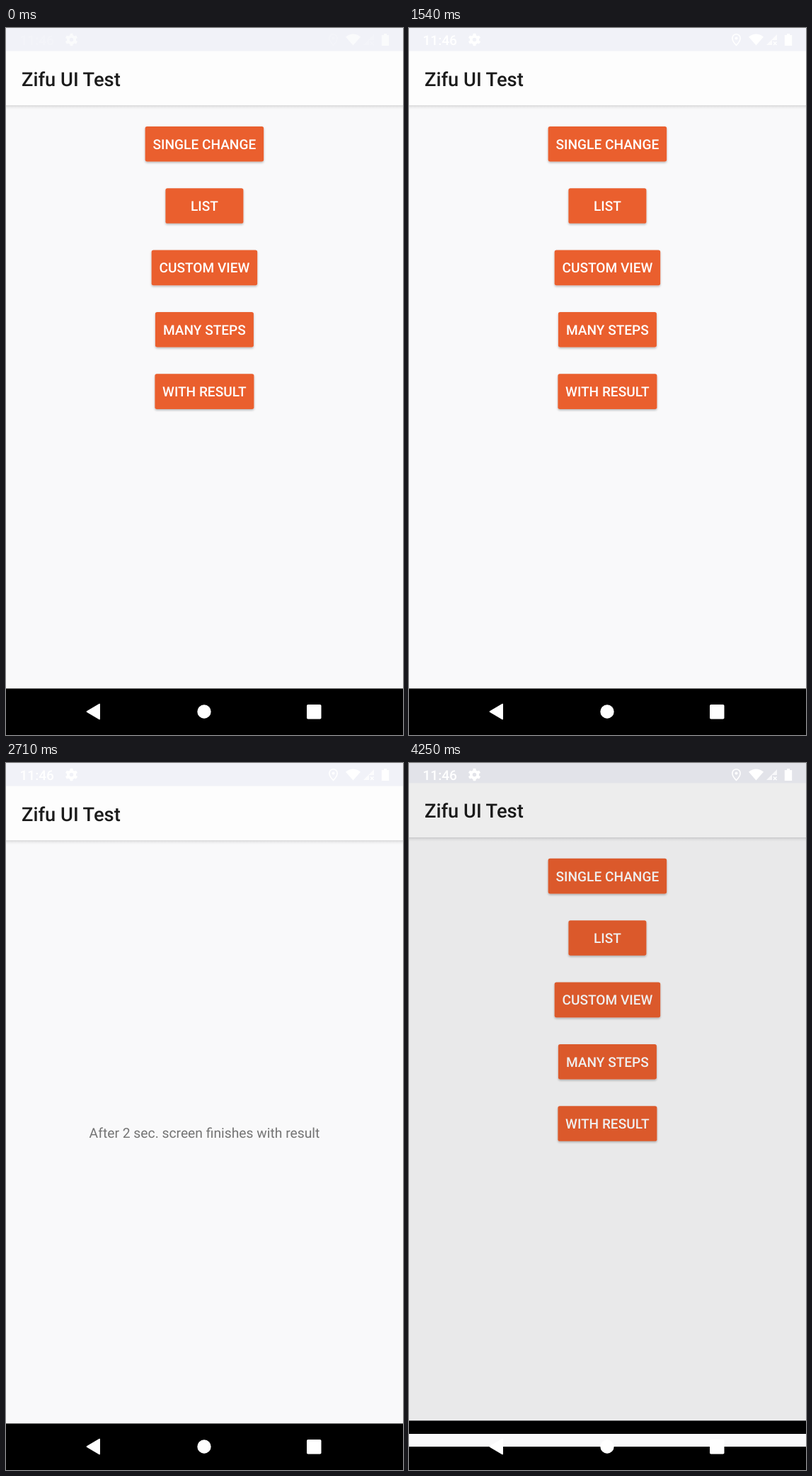
Recreate the animation shown at these times as an HTML page. Size 561 by 998 pixels, loop 4.34 s.

```html
<!DOCTYPE html>
<html lang="en">
<head>
<meta charset="utf-8">
<title>UI test</title>
<style>
  html, body { margin: 0; width: 100%; height: 100%; overflow: hidden; background: #000; }
  svg { display: block; width: 561px; height: 998px; }
  text { font-family: Roboto, "Noto Sans", sans-serif; text-rendering: geometricPrecision; }
  .title { font-size: 27.3px; font-weight: 500; fill: #1b1b1b; }
  .label { font-size: 19.1px; font-weight: 500; fill: #fff; text-anchor: middle; }
  .note { font-size: 19.3px; fill: #747474; text-anchor: middle; }
  .clock { font-size: 19.1px; font-weight: 500; }
</style>
</head>
<body>
<svg viewBox="0 0 561 998">
  <defs>
    <linearGradient id="shade" x2="0" y2="1">
      <stop offset="0" stop-color="#000" stop-opacity=".16"/>
      <stop offset=".4" stop-color="#000" stop-opacity=".06"/>
      <stop offset="1" stop-color="#000" stop-opacity="0"/>
    </linearGradient>
    <filter id="lift" x="-10%" y="-20%" width="120%" height="150%">
      <feDropShadow dx="0" dy="1.6" stdDeviation="1.4" flood-color="#000" flood-opacity=".28"/>
    </filter>
    <clipPath id="reveal"><rect id="revealBox" width="561" height="998"/></clipPath>
    <g id="frame">
      <rect width="561" height="998"/>
      <rect width="561" height="932.4" fill="#f9f9fa"/>
      <rect width="561" height="33" fill="#f1f2f8"/>
      <rect y="109" width="561" height="6" fill="url(#shade)"/>
      <rect y="32.5" width="561" height="76.7" fill="#fdfdfd"/>
      <text class="title" x="22" y="81.5">Zifu UI Test</text>
    </g>
  </defs>

  <g id="home"><use href="#frame"/></g>
  <rect id="dim" width="561" height="998" opacity="0"/>
  <g id="detail" clip-path="url(#reveal)">
    <use href="#frame"/>
    <text class="note" x="280.5" y="528.7">After 2 sec. screen finishes with result</text>
  </g>

  <g id="status" fill="#fff">
    <g class="thin">
      <text class="clock" x="19.5" y="23.8">11:46</text>
      <path d="M462.5 8.8a5.6 5.6 0 0 1 5.6 5.6c0 4.2-5.6 10-5.6 10s-5.6-5.8-5.6-10a5.6 5.6 0 0 1 5.6-5.6z" fill="none" stroke="#fff" stroke-width="1.6"/>
      <circle cx="462.5" cy="14.4" r="2"/>
      <path d="M520 9V17H513V24H505Z" opacity=".75"/>
      <path d="M515 19.5l4.5 4.5m0-4.5l-4.5 4.5" stroke="#fff" stroke-width="1.5"/>
    </g>
    <g id="gear" transform="translate(92.5 16.5)">
      <circle r="4.7" fill="none" stroke="#fff" stroke-width="3.8"/>
    </g>
    <path d="M480 12.5Q490.5 4.5 501 12.5L490.5 24.5Z"/>
    <path d="M534 8h4v2h3.2v15h-10.4V10h3.2z"/>
  </g>
  <g fill="#fff" stroke="#fff" stroke-linejoin="round">
    <path d="M114.4 965L132.2 954.5V975.5Z" stroke-width="1.5"/>
    <circle cx="280" cy="965" r="9.7" stroke="none"/>
    <rect x="425" y="955" width="20.5" height="20.5" rx="1.8" stroke="none"/>
  </g>
</svg>
<script>
const LOOP = 4340, RISE = 41, SINK = 20, HEIGHT = 998, DIM = .13;
const OPEN_STEPS = [1960, 2000, 2080, 2160, 2250, 2330, 2370, 2460];
const CLOSE_STEPS = [4000, 4080, 4160, 4250];
const $ = id => document.getElementById(id);

function add(parent, tag, attrs, text = '') {
  const el = document.createElementNS('http://www.w3.org/2000/svg', tag);
  for (const key in attrs) el.setAttribute(key, attrs[key]);
  el.textContent = text;
  parent.append(el);
}

const buttons = [
  ['SINGLE CHANGE', 167.5], ['LIST', 110], ['CUSTOM VIEW', 149.5],
  ['MANY STEPS', 139], ['WITH RESULT', 140]
];
buttons.forEach(([label, width], i) => {
  const y = 138.9 + i * 87.35;
  add($('home'), 'rect', {
    x: 280.4 - width / 2, y, width, height: 49.6, rx: 2.7,
    fill: '#ea5f2f', filter: 'url(#lift)'
  });
  add($('home'), 'text', { class: 'label', x: 280.4, y: y + 31.8 }, label);
});

for (let i = 0; i < 6; i++) {
  add($('gear'), 'rect', {
    x: -2, y: -8.7, width: 4, height: 4, rx: .6, transform: `rotate(${i * 60})`
  });
}

// Cubic curve through (x0,y0)..(x3,y3), solved for y at a given x.
function curve(x0, y0, x1, y1, x2, y2, x3, y3) {
  const at = (a, b, c, d, u) => {
    const v = 1 - u;
    return a * v * v * v + 3 * b * u * v * v + 3 * c * u * u * v + d * u * u * u;
  };
  return x => {
    let lo = 0, hi = 1;
    for (let i = 0; i < 24; i++) {
      const mid = (lo + hi) / 2;
      if (at(x0, x1, x2, x3, mid) < x) lo = mid; else hi = mid;
    }
    return at(y0, y1, y2, y3, lo);
  };
}

const slide = curve(0, 0, .4, 0, .2, 1, 1, 1);
const wipeIn = curve(0, 0, .05, 0, .1333, .06, .1667, .4);
const wipeOut = curve(.1667, .4, .2083, .82, .25, 1, 1, 1);
const wipe = t => t < .1667 ? wipeIn(t) : wipeOut(t);
const held = (steps, now) => steps.filter(s => s <= now).pop();

// shown: slide progress of the upper screen, open: its reveal, shade: darkness below it
function pose(shown, open, shade) {
  $('home').setAttribute('transform', `translate(0 ${-SINK * shown})`);
  $('detail').setAttribute('transform', `translate(0 ${RISE * (1 - shown)})`);
  $('detail').setAttribute('visibility', open > 0 ? 'visible' : 'hidden');
  $('revealBox').setAttribute('y', .959 * HEIGHT * (1 - open));
  $('dim').setAttribute('opacity', shade);
}

function draw(now) {
  if (now < OPEN_STEPS[0]) {
    pose(0, 0, 0);
  } else if (now < CLOSE_STEPS[0]) {
    const t = Math.min(1, .375 + (held(OPEN_STEPS, now) - 2080) / 425);
    pose(slide(t), wipe(t), DIM * Math.min(1, t * 2.3));
  } else {
    const t = .08 + (held(CLOSE_STEPS, now) - 4000) * .00175;
    pose(1 - slide(t), 1 - wipe(t), DIM * (1 - t));
  }
  const early = now < 330;
  $('status').setAttribute('opacity', early ? .7 : 1);
  document.querySelector('.thin').setAttribute('opacity', early ? .25 : 1);
}

function tick() {
  draw(performance.now() % LOOP);
  requestAnimationFrame(tick);
}
tick();
</script>
</body>
</html>
```
